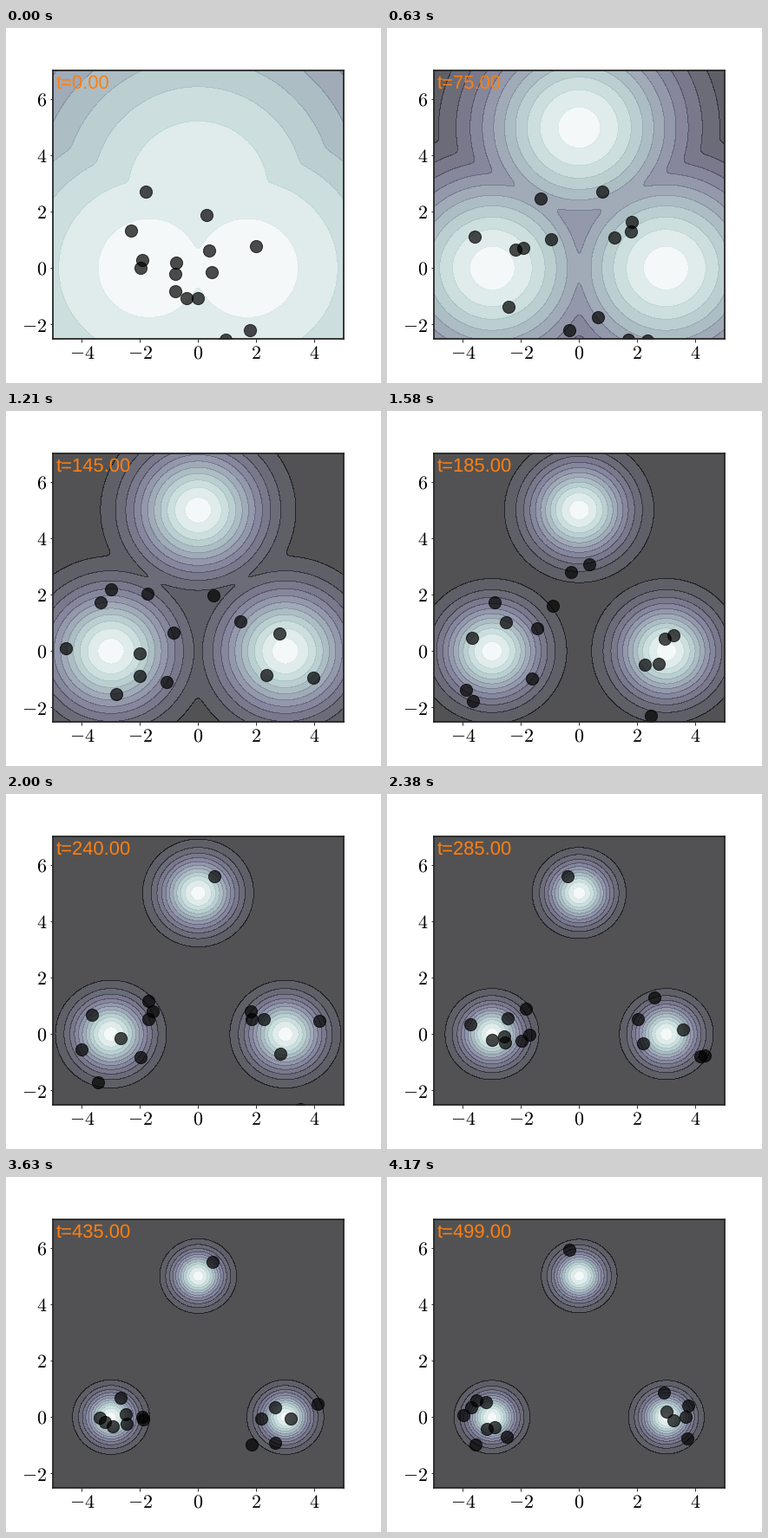
Animation of 432 by 410 pixels, one loop 4.21 s. Source, as a matplotlib script:

```python
import numpy as np
import matplotlib.pyplot as plt
from matplotlib.animation import FuncAnimation

plt.rcParams['mathtext.fontset'] = 'cm'
plt.rcParams['text.hinting'] = 'no_hinting'

FRAMES = 101
LOOP_MS = 4210
T = np.minimum(5 * np.arange(FRAMES), 499)
MODES = np.array([(-3, 0), (3, 0), (0, 5)])
CROWD = [8, 6, 1]   # walkers that settle in each well
SHARPNESS = 1.46    # inverse width of a fully formed well
BANDS = 12
STEP = 0.08         # Langevin step per frame


def fade(t):
    return np.exp(-t / 25)


def strength(t):
    """How far the wells have formed, from 0 to 1."""
    return 1 / (1 + np.exp((250 - t) / 60)) - 0.0097 * fade(t)


def walker_paths():
    """Langevin walk: free diffusion first, then a pull into each home well."""
    rng = np.random.default_rng(4)
    home = np.repeat(MODES, CROWD, axis=0)
    pos = rng.normal(0, 1.2, home.shape)
    pos = pos[np.argsort(pos[:, 0])]
    # left to right: left well, top well, right well
    home = home[np.argsort(home[:, 0], kind='stable')]
    paths = [pos]
    for t in T[1:]:
        pull = 2 * SHARPNESS * strength(t) * (home - pos)
        pos = pos + STEP * pull + rng.normal(0, np.sqrt(2 * STEP), pos.shape)
        paths.append(pos)
    return paths


X, Y = np.meshgrid(np.linspace(-5, 5, 201), np.linspace(-2.5, 7, 191))
LOG_MIX = np.logaddexp.reduce(
    [-SHARPNESS * ((X - mx) ** 2 + (Y - my) ** 2) for mx, my in MODES])


def landscape(t):
    """Annealed wells with a central pull that fades out early."""
    log_q = strength(t) * LOG_MIX - 0.0063 * fade(t) * (X ** 2 + Y ** 2)
    q = np.exp(log_q - log_q.max())
    return np.minimum(BANDS - (BANDS - 0.5) * q, BANDS - 0.001)


fig = plt.figure(figsize=(6, 410 / 72), dpi=72, facecolor='white')
ax = fig.add_axes([0.125, 0.125, 0.775, 0.755])
ax.set(xlim=(-5, 5), ylim=(-2.5, 7))
xt, yt = range(-4, 5, 2), range(-2, 7, 2)
ax.set_xticks(xt, [f'${v}$' for v in xt])
ax.set_yticks(yt, [f'${v}$' for v in yt])
ax.tick_params(labelsize=22, length=3.5, width=0.8, pad=3.5)
for spine in ax.spines.values():
    spine.set(linewidth=1.8, edgecolor='0.15')

PATHS = walker_paths()
dots = ax.scatter(*PATHS[0].T, s=200, color='k', alpha=0.7, zorder=2)
clock = ax.text(0.01, 0.934, '', transform=ax.transAxes, fontsize=22,
                family='Liberation Sans', color='tab:orange',
                va='baseline', zorder=3)
fill = None


def update(i):
    global fill
    if fill is not None:
        fill.remove()
    fill = ax.contourf(X, Y, landscape(T[i]), levels=np.arange(BANDS + 1),
                       cmap='bone_r', alpha=0.7, zorder=1)
    dots.set_offsets(PATHS[i])
    clock.set_text(f't={T[i]:.2f}')
    return fill, dots, clock


anim = FuncAnimation(fig, update, frames=FRAMES, interval=LOOP_MS / FRAMES,
                     init_func=lambda: (), repeat=True, repeat_delay=0,
                     blit=False)
plt.show()
```
